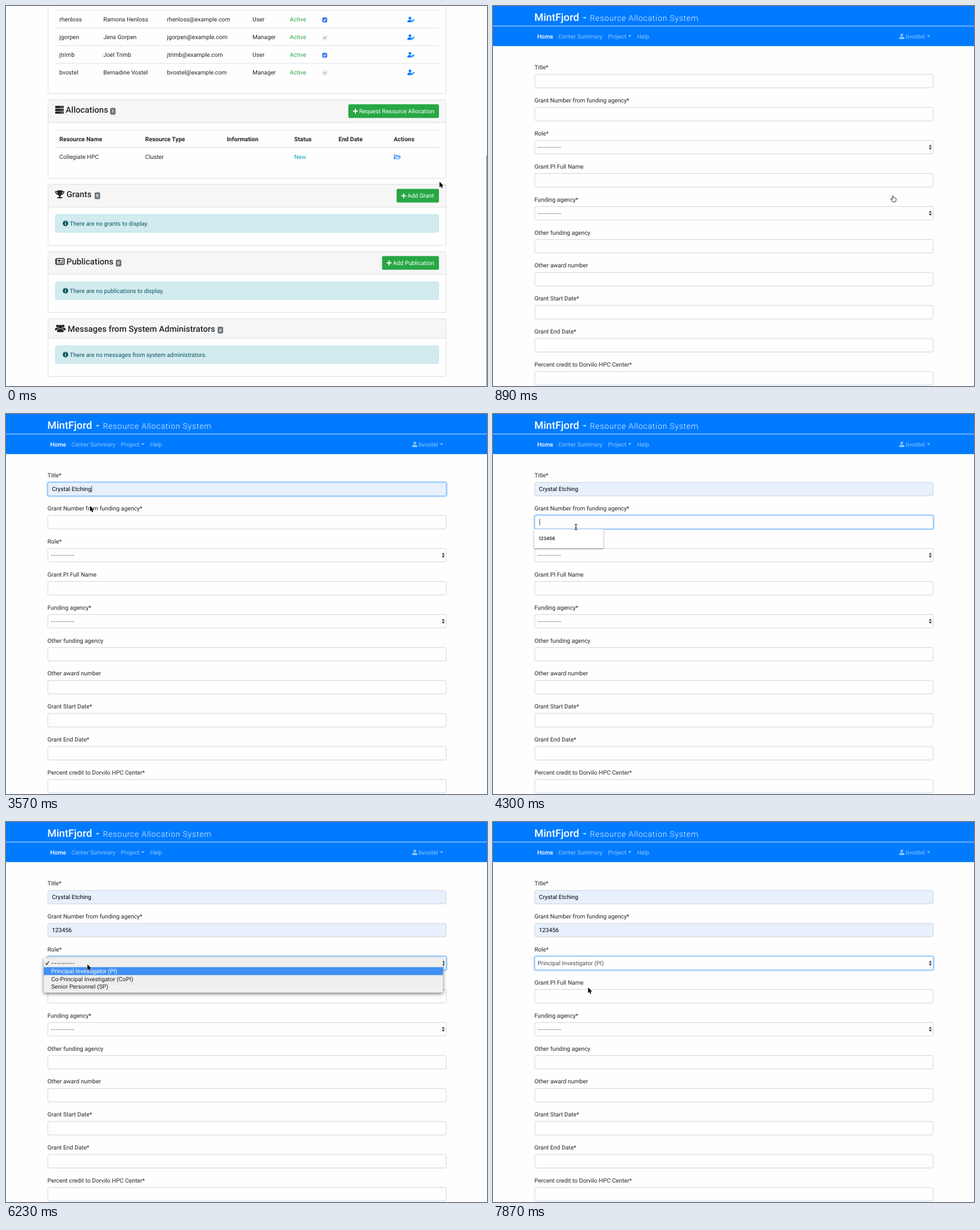
These frames come from a looping animation (841 by 666 pixels, 8000 ms). An HTML page:

```html
<!DOCTYPE html>
<html lang="en">
<head>
<meta charset="utf-8">
<title>Grant form</title>
<style>
html, body { margin: 0; width: 100%; height: 100%; overflow: hidden; background: #fefefe; }
svg { display: block; width: 841px; height: 666px; font: 10.3px Roboto, sans-serif; text-rendering: geometricPrecision; }
.head { font-size: 14.75px; font-weight: 500; }
.th { font-size: 10.5px; font-weight: 700; }
.badge { font-size: 7.6px; font-weight: 700; text-anchor: middle; }
.dash { font: 10px Inter, sans-serif; }
.hint { font: 600 8px Inter, sans-serif; }
.brand { font-size: 18.2px; font-weight: 500; }
.tagline { font-size: 14px; font-weight: 300; letter-spacing: .7px; }
.active { font-weight: 500; }
.shadow { filter: drop-shadow(0 1px 1.5px #0007); }
.popup { filter: drop-shadow(0 2px 3px #0008); }
</style>
</head>
<body>
<svg id="stage" viewBox="0 0 841 666"></svg>
<script>
const LOOP = 8000, TICK = 148.4;
const INK = '#212529', BLUE = '#007bff', GREEN = '#28a745', LINE = '#dee2e6', PALE = '#8fc5ff';
const stage = document.getElementById('stage');

const text = (x, y, s, fill = INK, cls = '') => `<text x="${x}" y="${y}" fill="${fill}" class="${cls}">${s}</text>`;
const rect = (x, y, w, h, fill, extra = '') => `<rect x="${x}" y="${y}" width="${w}" height="${h}" fill="${fill}" ${extra}/>`;
const path = (x, y, d, fill, extra = '') => `<path transform="translate(${x} ${y})" d="${d}" fill="${fill}" ${extra}/>`;
const stroke = (x, y, d, color, width = 1) => path(x, y, d, 'none', `stroke="${color}" stroke-width="${width}"`);
const circle = (x, y, r, fill) => `<circle cx="${x}" cy="${y}" r="${r}" fill="${fill}"/>`;
const rule = (y, h = 1) => rect(86, y, 671, h, LINE);

/* ---------- project page ---------- */
const person = (x, y, fill) => circle(x, y - 2.4, 2.4, fill) + path(x, y, 'M-4.4 4.8V3.3Q-4.4 .7-1.8 .7H1.8Q4.4 .7 4.4 3.3V4.8Z', fill);

const icons = {
  server: [0, 4.9, 9.8].map(dy => rect(86, 175 + dy, 15, 4, INK, 'rx="1"') +
    circle(96.3, 177 + dy, .7, '#f7f7f7') + circle(98.7, 177 + dy, .7, '#f7f7f7')).join(''),
  trophy: path(94, 323, 'M-4.4 0H4.4V1.6H8.2Q8.2 7 2.8 8.2Q2.2 9.6 1.2 9.9V12H4.3V14H-4.3V12H-1.2V9.9Q-2.2 9.6-2.8 8.2Q-8.2 7-8.2 1.6H-4.4ZM-6.5 3.2Q-6.2 5-4 6L-4.4 3.2ZM6.5 3.2H4.4L4 6Q6.2 5 6.5 3.2Z', INK),
  news: rect(88.5, 442.5, 13.2, 10.4, 'none', `rx="1" stroke="${INK}" stroke-width="1.5"`) +
    stroke(88, 444, 'M0 0H-1.3V7Q-1.3 8.8 1 8.8', INK, 1.3) + rect(91, 445, 4, 3, INK) +
    stroke(96.5, 445.6, 'M0 0H3.6M0 2.2H3.6M-5.5 4.8H3.6', INK, 1.1),
  group: person(90, 563.4, INK) + person(100, 563.4, INK) +
    path(95, 559, 'M-6 13V10Q-6 6.5-2.5 6.5H2.5Q6 6.5 6 10V13Z', INK, 'stroke="#f7f7f7" stroke-width=".8"') + circle(95, 562, 3.3, INK)
};

function card(top, mid, bottom) {
  const clip = `M73.5 ${mid}V${top + 2.5}q0-2.5 2.5-2.5H767q2.5 0 2.5 2.5V${mid}Z`;
  return path(0, 0, clip, '#f6f6f6') + rect(73.5, mid, 696, 1, '#dfdfdf') +
    rect(73.5, top, 696, bottom - top, 'none', 'rx="2.5" stroke="#dfdfdf"');
}
function heading(x, y, label, badgeX, count) {
  return text(x, y, label, INK, 'head') + rect(badgeX, y - 8.5, 9.6, 12, '#6c757d', 'rx="2.5"') +
    text(badgeX + 4.8, y + .3, count, '#fff', 'badge');
}
function button(x, y, label, state = 0) {
  const ring = state > 1 ? `stroke="#28a74580" stroke-width="4" paint-order="stroke"` : '';
  return rect(x, y, 757 - x, 24, state ? '#218838' : GREEN, 'rx="2.5" ' + ring) +
    stroke(x + 12.4, y + 12, 'M-4.2 0H4.2M0-4.2V4.2', '#fff', 1.9) + text(x + 19, y + 15.7, label, '#fff');
}
const notice = (y, subject) => rect(86.5, y, 670, 31, '#d1ebef', 'rx="2.5" stroke="#bee5eb"') +
  circle(104, y + 15.5, 4.8, '#0c5460') + rect(103.3, y + 12.2, 1.5, 1.5, '#d1ebef') + rect(103.3, y + 14.7, 1.5, 3.6, '#d1ebef') +
  text(111.5, y + 19.3, `There are no ${subject}.`, '#0c5460');

function userRow([login, name, role], i) {
  const y = 27.3 + i * 30.9, manager = role === 'Manager';
  return rule(Math.round(y - 20)) + text(93.3, y, login) + text(170.3, y, name) +
    text(281.5, y, login + '@example.com') + text(431, y, role) + text(496.3, y, 'Active', GREEN) +
    rect(553, y - 7.2, 8.6, 8.6, manager ? '#f5f5f5' : '#3478f0', `rx="1.8" ${manager ? 'stroke="#ddd" stroke-width=".7"' : ''}`) +
    stroke(557.3, y - 2.8, 'M-2.2 0L-.7 1.9L2.2-2.2', manager ? '#999' : '#fff', 1.2) +
    person(706.3, y - 3.6, BLUE) +
    path(708.6, y + 1.3, 'M0 0L.4-2.4 4.4-6.2 6-4.6 2.2-.5Z', BLUE, 'stroke="#fefefe" stroke-width=".7"');
}
const users = [['rhenloss', 'Ramona Henloss', 'User'], ['jgorpen', 'Jens Gorpen', 'Manager'],
  ['jtrimb', 'Joel Trimb', 'User'], ['bvostel', 'Bernadine Vostel', 'Manager']];
const columns = [[93.3, 'Resource Name'], [243.3, 'Resource Type'], [386, 'Information'],
  [504, 'Status'], [581.3, 'End Date'], [678, 'Actions']];

const projectPage = n =>
  rect(73.5, -9, 696, 162.5, 'none', 'rx="2.5" stroke="#dfdfdf"') + users.map(userRow).join('') +
  card(164.5, 204, 302) + icons.server + heading(104.3, 187, 'Allocations', 182, 1) +
  button(598.5, 172.3, 'Request Resource Allocation') +
  rule(217) + columns.map(([x, s]) => text(x, 236.7, s, INK, 'th')).join('') + rule(247.5, 1.4) +
  text(93.3, 268, 'Collegiate HPC') + text(243.3, 268, 'Cluster') + text(504, 268, 'New', '#17a2b8') +
  stroke(678.5, 260.5, 'M.3 7.3V.8H3.6L4.8 2H8.6V3.6M.3 7.3L2.7 3.7H11L8.8 7.3Z', BLUE, 1.1) +
  card(312.5, 352, 419.5) + icons.trophy + heading(105.8, 335, 'Grants', 155, 0) +
  button(683, 320.6, 'Add Grant', n < 3 ? 0 : n < 5 ? 1 : 2) + notice(365.5, 'grants to display') +
  card(430.5, 469.5, 537.5) + icons.news + heading(105.8, 453, 'Publications', 192, 0) +
  button(657.5, 438.3, 'Add Publication') + notice(483.5, 'publications to display') +
  card(548, 581.5, 649.5) + icons.group + heading(107.8, 570.5, 'Messages from System Administrators', 370, 0) +
  notice(595.5, 'messages from system administrators') + rect(840, 262, 1, 404, '#777');

/* ---------- grant form ---------- */
const labels = ['Title*', 'Grant Number from funding agency*', 'Role*', 'Grant PI Full Name', 'Funding agency*',
  'Other funding agency', 'Other award number', 'Grant Start Date*', 'Grant End Date*', 'Percent credit to Dorvilo HPC Center*'];
const TITLE = 'Crystal Etching', NUMBER = '123456', ROLE = 'Principal Investigator (PI)', DASHES = '---------';
const roles = [DASHES, ROLE, 'Co-Principal Investigator (CoPI)', 'Senior Personnel (SP)'];
const fieldTop = i => 119.9 + i * 57.87;

function field(label, i, focused, fill) {
  const y = fieldTop(i);
  return text(72.5, y - 8.7, label) +
    (focused ? rect(72.6, y - .4, 697.8, 24.4, 'none', 'rx="3" stroke="#b5d6fc" stroke-width="3.2"') : '') +
    rect(73.1, y, 696.6, 23.5, fill, `rx="2.5" stroke="${focused ? '#80bdff' : '#ced4da'}"`);
}
const selectBox = (i, value) => text(78, fieldTop(i) + 15.6, value, '#495057', value === DASHES ? 'dash' : '') +
  path(764.6, fieldTop(i) + 11.8, 'M-2.5-.9L0-4.5 2.5-.9ZM-2.5 .9L0 4.5 2.5 .9Z', '#343a40');

const caretMark = x => path(x, 51.6, 'M0 0H5.8L2.9 3Z', PALE);
const header = rect(0, 0, 841, 70.3, BLUE) + rect(0, 34.6, 841, 1, '#cfe6ff') +
  text(72.3, 26, 'MintFjord', '#fff', 'brand') + text(157.3, 26, '-', '#fff', 'brand') +
  text(169.5, 26, 'Resource Allocation System', '#e8f3ff', 'tagline') +
  text(77.3, 56.8, 'Home', '#fff', 'active') + text(114.5, 56.8, 'Center Summary', PALE) +
  text(201, 56.8, 'Project', PALE) + caretMark(236.3) + text(252, 56.8, 'Help', PALE) +
  person(714.7, 53.2, PALE) + text(721.8, 56.8, 'bvostel', PALE) + caretMark(758.6);

function suggestion(i, value, hovered) {
  const y = fieldTop(i) + 24;
  return rect(72, y, 121, 33.5, '#fff', 'class="shadow"') + (hovered ? rect(72, y + 7, 121, 19.5, '#e8e8e8') : '') +
    text(79.8, y + 19.7, value, '#222', 'hint');
}
function rolePopup(selected) {
  return rect(66, 238, 698, 61, '#efefef', 'rx="3" class="popup"') +
    (selected < 0 ? '' : rect(66, 240.5 + selected * 13.9, 698, 13.9, '#4090f5')) +
    stroke(72, 247.3, 'M-3 .2L-1 2.8L3-3.2', selected ? '#222' : '#fff', 1.2) +
    roles.map((s, i) => text(79, 250.9 + i * 13.8, s, i === selected ? '#fff' : '#222', i ? '' : 'dash')).join('');
}

function formPage(n) {
  const within = (a, b) => n >= a && n < b;
  const focus = n < 12 ? -1 : n < 28 ? 0 : n < 40 ? 1 : 2;
  const filled = [n >= 22, n >= 33];
  const caretOn = [[12, 15], [18, 21], [24, 27], [28, 32], [34, 38]].some(([a, b]) => within(a, b));
  const caretX = filled[focus] ? (focus ? 116.6 : 149.4) : 81.3;
  return header +
    labels.map((s, i) => field(s, i, i === focus, filled[i] ? '#e8f0fe' : '#fefefe')).join('') +
    selectBox(2, n < 50 ? DASHES : ROLE) + selectBox(4, DASHES) +
    [TITLE, NUMBER].map((s, i) => filled[i] ? text(80.3, fieldTop(i) + 15.5, s, '#000') : '').join('') +
    (caretOn ? rect(caretX, fieldTop(focus) + 6, .9, 11.6, '#333') : '') +
    (within(13, 24) ? suggestion(0, TITLE, n >= 21) : '') +
    (within(29, 34) ? suggestion(1, NUMBER, n >= 32) : '') +
    (within(40, 50) ? rolePopup(n < 42 ? 0 : n < 49 ? 1 : -1) : '');
}

/* ---------- pointer ---------- */
const shapes = {
  arrow: 'M0 0V9.8L2.2 7.8 3.7 11.2 5.4 10.5 3.9 7.2H7Z',
  hand: 'M-2-4.6Q-1-6 0-4.6L.5-2Q1.6-2.8 2.2-1.6Q3.2-2.2 3.7-1Q5-1.2 5-.2Q5.2 2.6 3.6 5.2H-1.2L-4.6 .6Q-4.6-.8-3.2-.3L-1.6 1Z',
  beam: 'M-2.4-4.8H-.9L0-4 .9-4.8H2.4M0-4V4M-2.4 4.8H-.9L0 4 .9 4.8H2.4M-1.2 1.2H1.2'
};
const route = [[0, 758, 308, 'arrow'], [3, 715, 330, 'hand'], [5, 700, 338, 'hand'], [6, 700, 338, 'hand'],
  [7, 560, 290, 'arrow'], [8, 420, 236, 'arrow'], [9, 290, 190, 'beam'], [10, 200, 150, 'arrow'], [11, 150.5, 128.5, 'beam'],
  [18, 150.5, 128.5, 'beam'], [19, 149, 137, 'beam'], [20, 149, 137, 'beam'], [21, 148, 156, 'arrow'], [22, 147, 161, 'arrow'],
  [24, 147, 161, 'arrow'], [26, 146, 182, 'beam'], [28, 145, 198, 'beam'], [31, 145, 198, 'beam'], [32, 135, 212, 'arrow'],
  [33, 122, 216, 'arrow'], [35, 122, 216, 'arrow'], [36, 128, 219.5, 'arrow'], [38, 138, 243, 'arrow'], [40, 138, 243, 'arrow'],
  [45, 149, 259.5, 'arrow'], [50, 149, 259.5, 'arrow'], [53, 166.3, 290, 'arrow'], [54, 166.3, 290, 'arrow']];

function pointer(n) {
  const next = route.findIndex(p => p[0] > n);
  const [t0, x0, y0, kind] = route[next - 1], [t1, x1, y1] = route[next];
  const k = (n - t0) / (t1 - t0), x = x0 + (x1 - x0) * k, y = y0 + (y1 - y0) * k;
  if (kind === 'beam') return stroke(x, y, shapes.beam, '#111', 1);
  return kind === 'hand'
    ? path(x, y, shapes.hand, '#fff', 'stroke="#111" stroke-width=".9"')
    : path(x, y, shapes.arrow, '#000', 'stroke="#fff" stroke-width="1" paint-order="stroke"');
}

let shown = -1;
function draw(now) {
  const n = Math.min(53, Math.floor((now % LOOP + 10) / TICK));
  if (n !== shown) stage.innerHTML = (n < 6 ? projectPage(n) : formPage(n)) + pointer(n);
  shown = n;
  requestAnimationFrame(draw);
}
draw(0);
</script>
</body>
</html>
```
